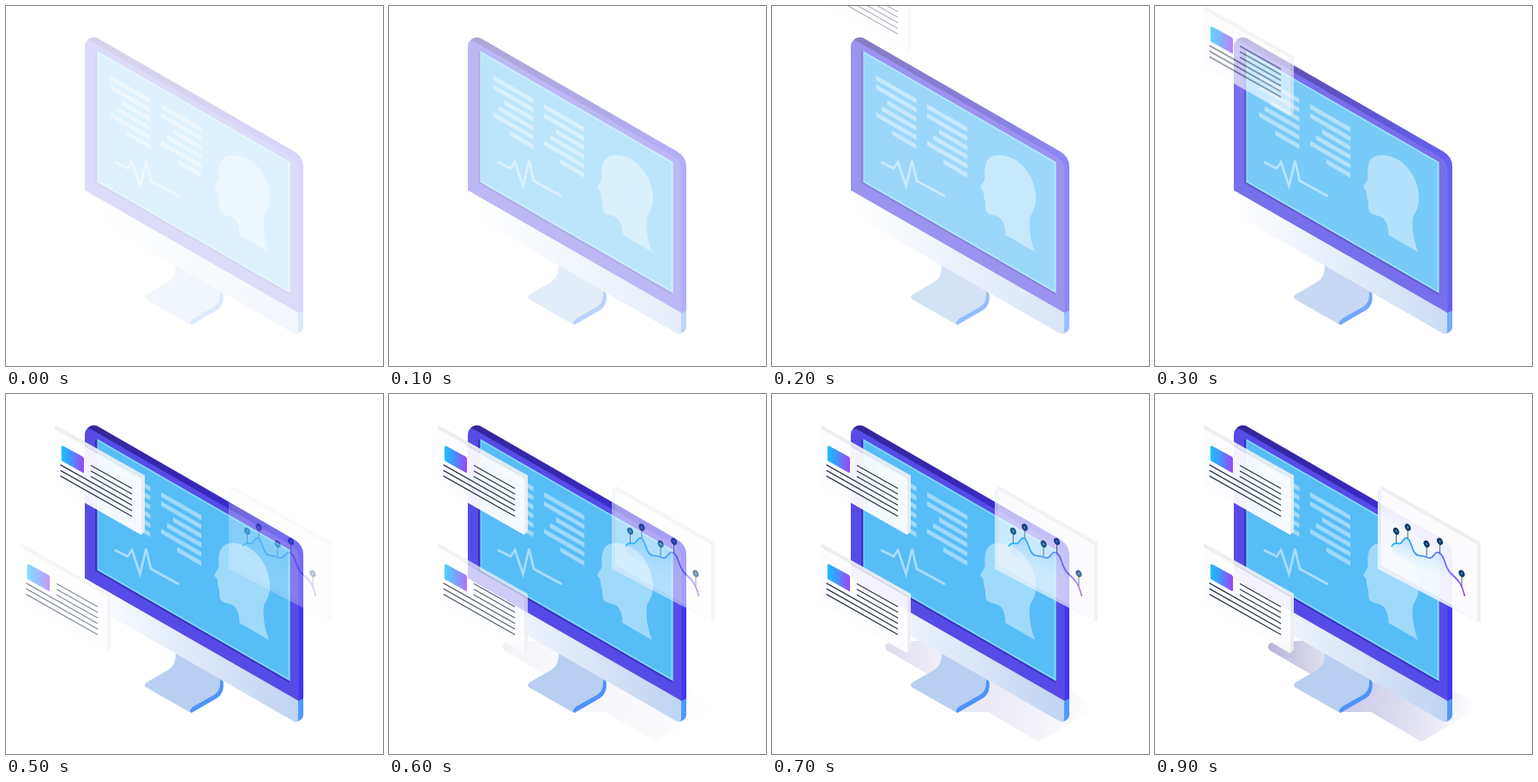
An HTML page for the animation above (1 s loop, 440 px wide and 420 px high).

```html
<!DOCTYPE html>
<html lang="en">
<head>
<meta charset="utf-8">
<title>Health dashboard</title>
<style>
  html, body { margin: 0; width: 100%; height: 100%; overflow: hidden; background: #fff; }
  svg { display: block; width: 440px; height: 420px; }

  .monitor, .shadow, .card { animation: 1s step-end infinite; }
  .monitor { animation-name: appear; }
  .shadow { animation-name: shade; }
  .top { animation-name: drop; }
  .low { animation-name: slide; }
  .chart { animation-name: fade; }

  @keyframes appear {
    0% { opacity: .2; }
    10% { opacity: .4; }
    20% { opacity: .6; }
    30% { opacity: .8; }
    40%, 100% { opacity: 1; }
  }
  @keyframes drop {
    0%, 10% { opacity: 0; transform: translateY(-220px); }
    20% { opacity: .35; transform: translateY(-110px); }
    30% { opacity: .68; transform: translateY(-36.5px); }
    40%, 100% { opacity: 1; transform: none; }
  }
  @keyframes slide {
    0%, 30% { opacity: 0; transform: translateX(-260px); }
    40% { opacity: .33; transform: translateX(-138px); }
    50% { opacity: .55; transform: translateX(-40px); }
    60% { opacity: .77; transform: none; }
    70%, 100% { opacity: 1; transform: none; }
  }
  @keyframes fade {
    0%, 40% { opacity: 0; }
    50% { opacity: .3; }
    60% { opacity: .57; }
    70% { opacity: .75; }
    80% { opacity: .9; }
    90%, 100% { opacity: 1; }
  }
  @keyframes shade {
    0%, 50% { opacity: 0; }
    60% { opacity: .16; }
    70% { opacity: .45; }
    80% { opacity: .73; }
    90%, 100% { opacity: 1; }
  }
</style>
</head>
<body>
<svg viewBox="0 0 440 420">
  <defs>
    <linearGradient id="rim" gradientUnits="userSpaceOnUse" x1="95" y1="0" x2="347" y2="0">
      <stop offset="0" stop-color="#35269a"/><stop offset=".45" stop-color="#3726b4"/>
      <stop offset="1" stop-color="#4136f4"/>
    </linearGradient>
    <linearGradient id="chin" gradientUnits="userSpaceOnUse" x1="98" y1="0" x2="341" y2="0">
      <stop offset="0" stop-color="#fff"/><stop offset=".42" stop-color="#e3ecfa"/>
      <stop offset="1" stop-color="#bfd3f3"/>
    </linearGradient>
    <linearGradient id="photo">
      <stop offset="0" stop-color="#14c3ff"/><stop offset=".45" stop-color="#4a8ffb"/>
      <stop offset="1" stop-color="#a044f5"/>
    </linearGradient>
    <linearGradient id="curve" gradientUnits="userSpaceOnUse" x1="276" y1="0" x2="362" y2="0">
      <stop offset="0" stop-color="#10b8f5"/><stop offset=".5" stop-color="#4a83f6"/>
      <stop offset="1" stop-color="#9a45f3"/>
    </linearGradient>
    <linearGradient id="area" gradientUnits="userSpaceOnUse" x1="312" y1="168" x2="300" y2="207">
      <stop offset="0" stop-color="#8cc8ff" stop-opacity=".65"/>
      <stop offset="1" stop-color="#d8ecff" stop-opacity="0"/>
    </linearGradient>
    <linearGradient id="shadeLeft" gradientUnits="userSpaceOnUse" x1="132" y1="0" x2="205" y2="0">
      <stop offset="0" stop-color="#b5b4d8"/><stop offset="1" stop-color="#e6e4f3"/>
    </linearGradient>
    <linearGradient id="shadeRight" gradientUnits="userSpaceOnUse" x1="235" y1="345" x2="372" y2="372">
      <stop offset="0" stop-color="#cdcdea"/><stop offset=".6" stop-color="#e5e4f4"/>
      <stop offset="1" stop-color="#fff"/>
    </linearGradient>
    <g id="note">
      <path d="M57 36L162 95V160L158 164V98L57 41Z" fill="#eeeef1" fill-opacity=".93"/>
      <path d="M57 41L158 98V164.5L57 107Z" fill="#fdfdff" fill-opacity=".94"/>
      <path d="M66.5 60.5L89.5 73Q91 74 91 75.500V91Q91 92.500 89.500 91.700L66 78.500Q64.700 77.800 64.700 76.500V61.500Q65 60 66.500 60.500Z" fill="url(#photo)"/>
      <g class="lines" stroke="#26354b" stroke-width="1.25"></g>
    </g>
  </defs>

  <g class="shadow">
    <path d="M134 291Q137 289 142 290L205 285V335L180 326L134 299Q130 295 134 291Z" fill="url(#shadeLeft)"/>
    <path d="M215 371L240 335L347 345L380 365L313 404.500Q311 405.500 309 404.500L252 371Z" fill="url(#shadeRight)"/>
  </g>

  <g class="monitor">
    <path d="M249 332L253.500 335Q255.500 349 246 355L216.500 372L213 370Z" fill="#4f92fb"/>
    <path d="M198 300L250 331V337Q250 347 242 351.500L216 366Q215 367 215 371.500L164 342.500Q160 339.500 164 336.500L190 321.500Q199 316 198 300Z" fill="#b8cff1"/>
    <path d="M92 214L341.500 357V379Q341.500 384 336 382L92 242Z" fill="url(#chin)"/>
    <path d="M341 357.500L347 355V374Q347 380 340 382Q341 380 341 377Z" fill="#5297fb"/>
    <path d="M94.500 40.500Q99.500 34.800 106 37L336 169.500Q347 176 347 187V355.500L341 358Z" fill="url(#rim)"/>
    <path d="M92 47Q92.500 38 100 41.500L331 175Q341.500 181 341.500 191V358L92 215Z" fill="#574be7"/>
    <path d="M104 53L107 53L331 334V337L104 206.500Z" fill="#3a31bd"/>
    <path d="M106.500 52.500L331.500 182V335L106.500 205.500Z" fill="#80dcff"/>
    <path d="M107.500 55L329.500 183V331.800L107.500 204Z" fill="#57bdf7"/>
    <g fill="#fff" fill-opacity=".43">
      <g id="bars"></g>
      <path d="M249 186C251 177 257 173.500 266 174C288 175 306 196 308 221C309 236 303 241 301 247C299 260 303 277 307 287L272.500 267C272.500 258 270 249 264 246C258 243.500 252 244 250 239C248.500 235 250 229 247.500 224C246.500 221 247.500 218 246 215C244 213.500 243 212 243.500 210C246 206 249 203 248.500 198C248 194 248 190 249 186Z"/>
    </g>
    <path d="M127 182L142 189.500L147 182L156.500 210L163.500 180.500L169 204L202 222" fill="none" stroke="#fff" stroke-opacity=".48" stroke-width="2.7"/>
  </g>

  <g class="card top"><use href="#note"/></g>
  <g class="card low"><use href="#note" y="138"/></g>

  <g class="card chart">
    <path d="M264 107L380 173V266.500L376 264V176L264 112Z" fill="#eeeeef" fill-opacity=".93"/>
    <path d="M260 112L264 110V200L376 264L378 266L260 204Z" fill="#edf2fd" fill-opacity=".92"/>
    <path d="M264 111.500L376 176V264L264 200Z" fill="#fcfcff" fill-opacity=".94"/>
    <path d="M276 178C280 171 284 176 287 174C290 171 291 167 294 168C300 170 299 187 308 188.500C313 189 315 189 319 191C325 194 326 182 331 185C339 188 337 201 345 209L340 222L280 188Z" fill="url(#area)"/>
    <path d="M276 178C280 171 284 176 287 174C290 171 291 167 294 168C300 170 299 187 308 188.500C313 189 315 189 319 191C325 194 326 182 331 185C339 188 337 201 345 209C354 217 358 221 361.500 236" fill="none" stroke="url(#curve)" stroke-width="1.7"/>
    <g id="pins"></g>
  </g>
</svg>
<script>
  const add = (parent, tag, attrs) => {
    const el = document.createElementNS("http://www.w3.org/2000/svg", tag);
    for (const key in attrs) el.setAttribute(key, attrs[key]);
    parent.append(el);
  };
  const find = s => document.querySelector(s);

  // Slanted text bars, aligned at the right end
  const column = (right, top, indents) => indents.forEach((indent, i) => {
    const x = right - 47 + indent;
    const y = top + i * 10.7;
    const left = y - (right - x) * 0.577;
    add(find("#bars"), "path", { d: `M${x} ${left}L${right} ${y}v5.500L${x} ${left + 5.5}Z` });
  });
  column(168.5, 108, [0, 0, 13, 6.5, 0, 19]);
  column(228, 141.5, [0, 0, 14, 7, 0, 19]);

  for (let i = 0; i < 6; i++) {
    const x = i < 3 ? 99 : 63.5;
    const y = 110.3 + i * 6.5;
    add(find(".lines"), "line", { x1: x, y1: y - (147 - x) * 0.565, x2: 147, y2: y });
  }

  // Head position and stem length
  const pins = [[281.5, 160, 14], [295, 155.5, 13], [317, 175, 14], [332.5, 172, 14], [358, 209.5, 15]];
  for (const [x, y, len] of pins) {
    const g = find("#pins");
    const turn = `rotate(-25 ${x} ${y})`;
    add(g, "line", { x1: x, y1: y, x2: x, y2: y + len, stroke: "#47627f", "stroke-width": 1 });
    add(g, "ellipse", { cx: x, cy: y, rx: 3.2, ry: 4.4, fill: "#12355f", transform: turn });
    add(g, "ellipse", { cx: x, cy: y, rx: 1.1, ry: 1.7, fill: "#2f86bd", transform: turn });
  }
</script>
</body>
</html>
```
